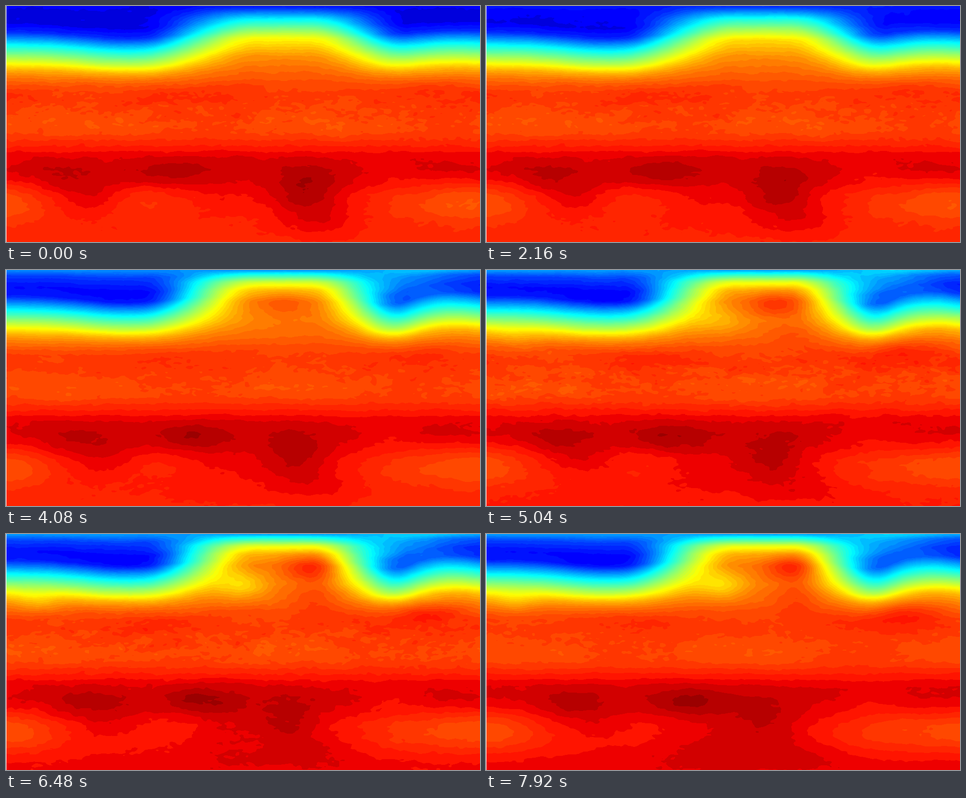
Write a matplotlib script that moves like this. It is 1000 px wide and 500 px high and loops after 8 s.

```python
import numpy as np
import matplotlib.pyplot as plt
from matplotlib.animation import FuncAnimation

W, H = 1000, 500
LOOP, TICK, STEP = 8000, 40, 120
NORTH = 180
x = np.arange(W, dtype=np.float32)
y = np.arange(H, dtype=np.float32)[:, None]
rng = np.random.default_rng(12)


def ease(a, b, v):
    u = np.clip((v - a) / (b - a), 0, 1)
    return u * u * (3 - 2 * u)


def mix(a, b, u):
    return np.asarray(a) + (np.asarray(b) - np.asarray(a)) * u


def bump(v, center, spread):
    return np.exp(-((v - center) / spread) ** 2 / 2)


def blob(cx, cy, sx, sy):
    """Soft spot that wraps around the left and right edges."""
    dx = (x - cx + W / 2) % W - W / 2
    return bump(dx, 0, sx) * bump(y, cy, sy)


def profile(keys, levels, size=9):
    """Smooth curve through a few points, sampled per pixel row."""
    k = np.hanning(size + 2)[1:-1]
    v = np.interp(np.arange(keys[-1] + 1), keys, levels)
    return np.convolve(np.pad(v, size // 2, mode="edge"), k / k.sum(), "valid")


def noise(sx, sy):
    """Periodic smooth noise with unit spread."""
    fx, fy = np.fft.rfftfreq(W), np.fft.fftfreq(H)[:, None]
    spec = np.fft.rfft2(rng.standard_normal((H, W)))
    n = np.fft.irfft2(spec * np.exp(-(fx * sx * 2) ** 2 - (fy * sy * 2) ** 2), s=(H, W))
    return (n / n.std()).astype(np.float32)


# Levels count down from the hottest colour, 0.
STOPS = [0, 4, 5, 18.5, 34.5, 48, 52]
level = np.arange(53)
palette = np.stack([
    np.interp(level, STOPS, [128, 238, 255, 255, 0, 0, 0]),
    np.interp(level, STOPS, [0, 0, 20, 255, 255, 0, 0]),
    np.interp(level, STOPS, [0, 0, 0, 0, 255, 255, 120]),
], axis=1).astype(np.uint8)

# Mean level from the tropics to the south pole
zonal = profile([0, 180, 200, 250, 270, 297, 320, 345, 370, 400, 430, 500],
                [7.6, 7.6, 7.2, 7.9, 7.6, 5.4, 3.6, 3.1, 3.6, 4.7, 5.4, 6], 15)
zonal = zonal[:H, None].astype(np.float32)

layers = [noise(*s) for s in [(10, 5), (40, 16)] for _ in range(3)]
rough = (0.07 + 0.16 * bump(y, 225, 32)).astype(np.float32)
layers = [n * rough for n in layers]

# Columns through the cold air and through the warm ridge, early and late
COLD_Y = [0, 12, 35, 55, 82, 122, 135, 150, 165, 180]
COLD_EARLY = [48, 48.6, 48.7, 46, 34.5, 18.5, 14, 10.8, 8.8, 7.6]
COLD_LATE = [39.5, 44.5, 47.5, 46.5, 35.5, 18.5, 14, 10.8, 8.8, 7.6]
RIDGE_Y = [0, 8, 25, 42, 66, 105, 140, 165, 180]
RIDGE_EARLY = [47, 43.5, 35, 28, 18.5, 12, 9.3, 8, 7.6]
RIDGE_LATE = [39.5, 33, 20, 14, 11, 11, 9.6, 8, 7.6]

# Southern eddies: x at start and end, y, spread, strength at start and end
EDDIES = [
    (905, 880, 412, 105, 32, 2.3, 2.3),
    (0, 30, 415, 60, 32, 1.8, 2.2),
    (345, 430, 355, 60, 22, -1.4, -2),
    (110, 180, 358, 55, 23, -.8, -1.3),
    (170, 230, 402, 48, 25, -1.3, -.8),
    (635, 590, 400, 52, 38, -3, -1.5),
    (300, 345, 408, 52, 27, 1.6, .6),
    (480, 480, 440, 130, 40, 0, -1.8),
    (670, 690, 460, 60, 26, -1.4, -.8),
    (800, 810, 350, 45, 20, .5, .9),
]


def polar_front(t, grown):
    """Cold cap that a warm ridge breaks open."""
    n = y[:NORTH]
    rows = np.arange(NORTH + 1)
    chill = bump(t, 1200, 650)
    fade = np.clip(n / 40, 0, 1) * np.clip((185 - n) / 60, 0, 1)

    dip = 13 * bump(x, 255, 85) + (5 + 14 * grown) * bump(x, 805, 45)
    dip = dip - (4 + 6 * grown) * bump(x, 950, 60)
    cold = np.interp(n - dip * fade, rows,
                     profile(COLD_Y, mix(COLD_EARLY, COLD_LATE, grown)))
    cold = cold - 5 * grown * bump(x, 855, 80) * bump(n, 30, 35)
    cold = cold + grown * bump(x, 240, 70) * bump(n, 55, 20)

    ridge = np.interp(n - 13 * chill * fade, rows,
                      profile(RIDGE_Y, mix(RIDGE_EARLY, RIDGE_LATE, grown)))
    share = ease(285, 530, x) * (1 - ease(640, 850, x))
    return mix(cold, ridge, share) + 1.2 * chill * bump(n, 0, 25)


def picture(t):
    run = t / LOOP
    grown = ease(1200, 4800, t)
    ripe = ease(3300, 6600, t)

    f = np.broadcast_to(zonal, (H, W)).copy()
    f[:NORTH] += polar_front(t, grown) - 7.6

    # Curl of the ridge and the warm tongue east of it
    f -= (3 * grown + 2 * ripe) * blob(mix(575, 645, ripe), 70, 42, 20)
    f -= 2.2 * ripe * blob(655, 130, 35, 25)
    f += 5 * ripe * blob(500, 108, 36, 22)
    f -= (0.5 + 1.8 * ripe) * blob(885, 168, 45, 18)
    f += 2.5 * ripe * blob(60, 140, 35, 18)

    # Tropical bands
    swell = np.cos(4 * np.pi * (x / W - 0.41 + 0.1 * run))
    f -= 0.5 * (1 + swell) * bump(y, 186, 16)
    f -= 0.5 * swell * bump(y, 247, 24)

    for x0, x1, cy, sx, sy, a0, a1 in EDDIES:
        f += mix(a0, a1, run) * blob(mix(x0, x1, run), cy, sx, sy)
    f -= 2 * ease(3500, 7200, t) * bump(y, H, 32)

    for j, n in enumerate(layers):
        f += n * np.float32(np.cos(t / STEP * (0.35 + 0.11 * (j % 3)) + 2.1 * j))

    img = palette[np.clip(np.rint(f), 0, 52).astype(np.uint8)]
    img[:, 0] = 255
    return img


fig = plt.figure(figsize=(W / 100, H / 100), dpi=100)
ax = fig.add_axes([0, 0, 1, 1])
ax.axis("off")
image = ax.imshow(picture(0), interpolation="nearest", aspect="auto")
shown = {"t": 0}


def draw(i):
    t = i * TICK // STEP * STEP
    if t != shown["t"]:
        image.set_data(picture(t))
        shown["t"] = t
    return [image]


anim = FuncAnimation(fig, draw, frames=LOOP // TICK, interval=TICK,
                     repeat=True, repeat_delay=0)
plt.show()
```
